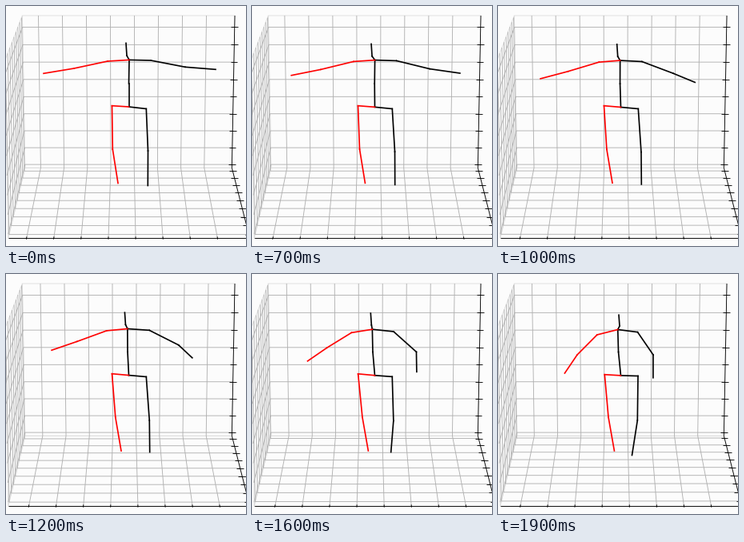
Animation of 300 by 300 pixels, one loop 2 s. Source, as a matplotlib script:

```python
import numpy as np
import matplotlib.pyplot as plt
from matplotlib.animation import FuncAnimation
from matplotlib.collections import LineCollection
from matplotlib.patches import Polygon

SIZE, DPI = 300, 80
FRAMES, STEP_MS = 20, 100
BOX = 8.854                    # box side, in grid cells
TICK = 0.148


def project(across, depth, height):
    """Perspective view of a box point; depth grows towards the viewer."""
    d, h = depth / BOX, height / BOX
    w = 0.03425 - 0.00492 * d - 0.00092 * h
    return 149.1 + (across - 4.29) / w, (6.9288 + 1.577 * d - 6.5288 * h) / w


def path(*points):
    return [project(*p) for p in points]


def smooth(begin, end):
    def ease(frame):
        u = np.clip((frame - begin) / (end - begin), 0, 1)
        return u * u * (3 - 2 * u)
    return ease


def power(exponent):
    return lambda frame: (frame / (FRAMES - 1)) ** exponent


# The rhythms shared by all parts of the body
drift, slow, snap = power(1), power(2.8), power(12)
early, soft, late = smooth(2, 17), smooth(4, 20), smooth(5.5, 20)
stride, sway = smooth(13, 19), smooth(5, 14)


def move(start, *parts):
    """Position that adds (ease, dx, dy) parts to a starting point."""
    def at(frame):
        return np.array(start) + sum(ease(frame) * np.array(step) for ease, *step in parts)
    return at


joints = {
    "hip": move((153.5, 126), (drift, 0, 0.9)),
    "spine": move((153.5, 97), (soft, -3, 0.5)),
    "thorax": move((154, 67.4), (soft, -4.3, 2.1)),
    "neck": move((151, 62), (drift, -2.5, 2), (snap, 3.5, 1)),
    "head": move((150, 46.4), (drift, -2.5, 2.8), (snap, 3.5, 2)),
    "r_hip": move((132.5, 124.7), (snap, 0.8, 1)),
    "r_knee": move((133.3, 179), (early, 4.7, 0)),
    "r_foot": move((140, 221.5), (early, 5.4, -0.5)),
    "l_hip": move((175.3, 128.5), (snap, -0.3, -1)),
    "l_knee": move((177.5, 181), (drift, 2.8, 3), (stride, -6, 0), (snap, 0, -1)),
    "l_foot": move((177.3, 224.5), (drift, 3.8, -3), (stride, -13.6, 0), (snap, 0, 5)),
    "l_shoulder": move((181, 68), (slow, -6.5, 0), (soft, 0, 4.7)),
    "l_elbow": move((224, 76.3), (slow, -30, 0), (soft, 0, 25)),
    "l_wrist": move((262, 79.3), (late, -69, 0), (soft, 0, 51)),
    "r_shoulder": move((127, 69), (late, -3.2, 0), (slow, 0, 7)),
    "r_elbow": move((85, 78), (slow, 14, 23)),
    "r_wrist": move((47, 84.3), (slow, 36.4, 39.7)),
}
chains = [
    ("black", "hip spine thorax neck head"),
    ("black", "hip l_hip l_knee l_foot"),
    ("black", "thorax l_shoulder l_elbow l_wrist"),
    ("red", "hip r_hip r_knee r_foot"),
    ("red", "thorax r_shoulder r_elbow r_wrist"),
]
bones = [(color, a, b) for color, chain in chains
         for a, b in zip(chain.split(), chain.split()[1:])]

# Where the first floor lines fall as the view follows the body
floor = move((0.67, 0.47), (sway, 0.095, 0), (snap, -0.03, 0), (slow, 0, -0.15))
heights = 0.2 + np.arange(9)

fig = plt.figure(figsize=(SIZE / DPI, SIZE / DPI), dpi=DPI, facecolor="#fcfcfc")
ax = fig.add_axes([0, 0, 1, 1])
ax.set_xlim(0, SIZE)
ax.set_ylim(SIZE, 0)
ax.axis("off")


def add_lines(segments=(), **style):
    return ax.add_collection(LineCollection(segments, **style))


B = BOX
panes = [
    path((0, 0, 0), (0, 0, B), (0, B, B), (0, B, 0)),
    path((0, 0, 0), (B, 0, 0), (B, 0, B), (0, 0, B)),
    path((0, 0, 0), (B, 0, 0), (B, B, 0), (0, B, 0)),
]
for corners in panes:
    ax.add_patch(Polygon(corners, facecolor="none", edgecolor="#dedede", lw=0.8, zorder=0))

edges = [
    path((0, B, 0), (B, B, 0)),
    path((B, 0, 0), (B, B, 0)),
    path((B, 0, 0), (B, 0, B)),
]
add_lines(edges, colors="black", linewidths=0.8, zorder=3)
grid = add_lines(colors="#b0b0b0", linewidths=0.8, zorder=1)
ticks = add_lines(colors="black", linewidths=0.8, zorder=3)
body = add_lines(colors=[b[0] for b in bones], linewidths=1.5,
                 capstyle="projecting", zorder=4)


def draw(frame):
    x0, y0 = floor(frame)
    xs, ys = x0 + np.arange(8), y0 + np.arange(9)
    grid.set_segments(
        [path((x, 0, B), (x, 0, 0), (x, B, 0)) for x in xs]
        + [path((0, y, B), (0, y, 0), (B, y, 0)) for y in ys]
        + [path((0, B, z), (0, 0, z), (B, 0, z)) for z in heights])
    lo, hi = B - TICK, B + TICK
    ticks.set_segments(
        [path((x, lo, 0), (x, hi, 0)) for x in xs]
        + [path((lo, y, 0), (hi, y, 0)) for y in ys]
        + [path((lo, 0, z), (hi, 0, z)) for z in heights])
    pose = {name: at(frame) for name, at in joints.items()}
    body.set_segments([[pose[a], pose[b]] for _, a, b in bones])
    return grid, ticks, body


anim = FuncAnimation(fig, draw, frames=FRAMES, interval=STEP_MS, repeat=True, repeat_delay=0)
plt.show()
```
